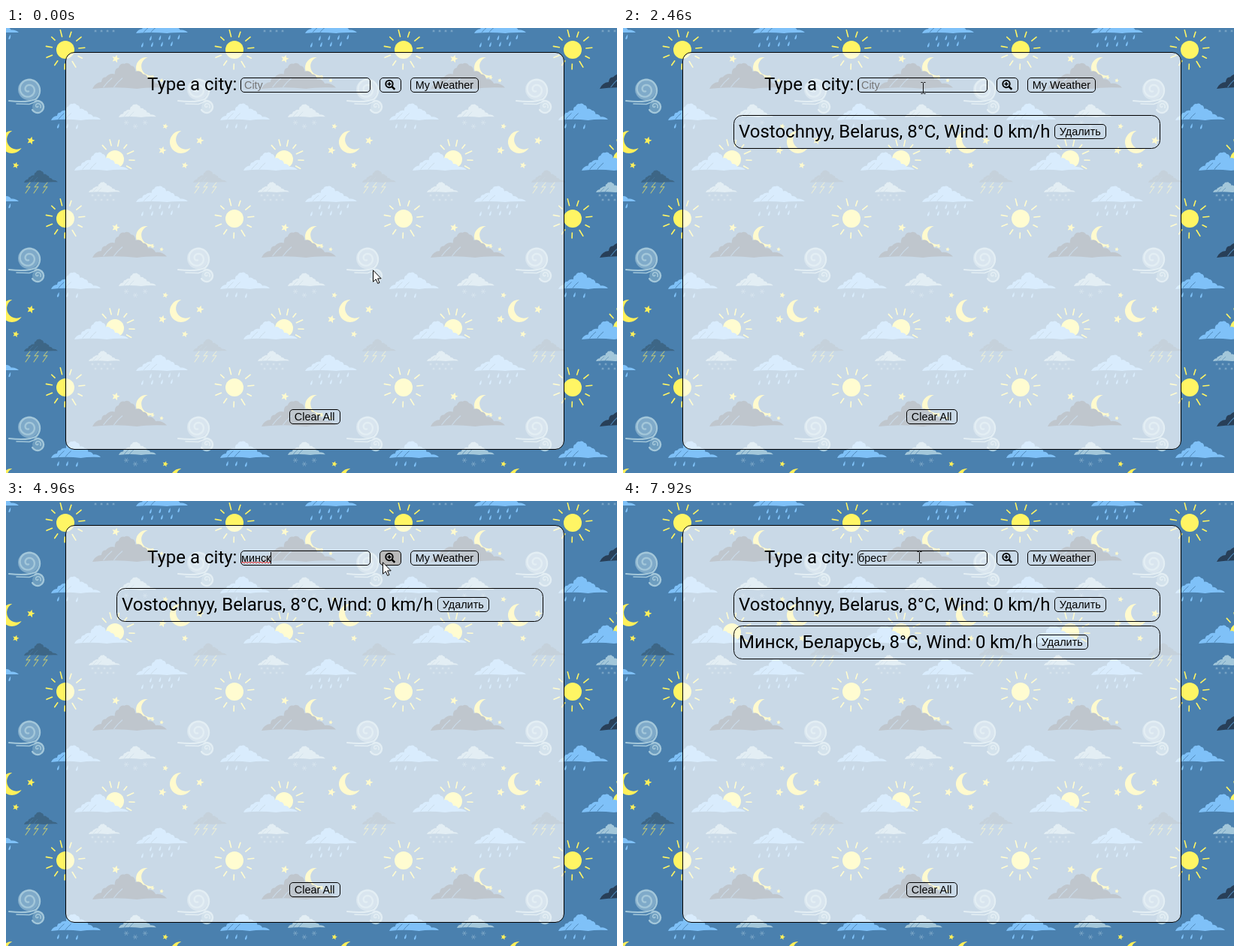
An HTML page with a canvas that plays this animation: 813 px wide and 593 px high, repeating every 8000 ms.

```html
<!DOCTYPE html>
<html lang="en">
<head>
<meta charset="utf-8">
<title>Weather</title>
<style>
html, body { margin: 0; width: 100%; height: 100%; overflow: hidden; background: #4a80ae; }
canvas, svg { position: absolute; left: 0; top: 0; display: block; }
text { white-space: pre; }
.big { font: 24px Roboto, sans-serif; }
.ui { font: 14.4px "Liberation Sans", Arial, sans-serif; }
.box { fill: none; stroke: #000; }
.hot { fill: #b9b9b9; }
</style>
</head>
<body>
<canvas id="sky" width="813" height="593"></canvas>
<svg width="813" height="593" viewBox="0 0 813 593">
  <rect x="79.5" y="32.5" width="663" height="529" rx="11.5" fill="#fff" fill-opacity=".7" stroke="#000"/>
  <text class="big" x="188" y="83">Type a city:</text>
  <rect class="box" x="312.5" y="66.5" width="172" height="19" rx="4.5"/>
  <text id="hint" class="ui" x="317" y="81" fill="#757575">City</text>
  <text id="typed" class="ui" x="313" y="81"></text>
  <path id="wave" fill="none" stroke="#e02020"/>
  <path id="caret" stroke="#000"/>

  <rect id="find" class="box" x="497.5" y="66.5" width="28" height="19" rx="4.5"/>
  <g fill="none" stroke="#000">
    <circle cx="510" cy="74.6" r="4.7" stroke-width="1.9"/>
    <path d="M513.6 78.2L517.3 81.9" stroke-width="2.6"/>
    <path d="M507.5 74.6h5M510 72.1v5" stroke-width="1.6"/>
  </g>
  <rect id="mine" class="box" x="538.5" y="66.5" width="90" height="19" rx="4.5"/>
  <text class="ui" x="544.8" y="81">My Weather</text>

  <g id="row1">
    <rect class="box" x="147.5" y="116.5" width="567" height="44" rx="11"/>
    <text class="big" x="154" y="146">Vostochnyy, Belarus, 8°C, Wind: 0 km/h</text>
    <rect class="box" x="574.5" y="128.5" width="68" height="19" rx="4.5"/>
    <text class="ui" x="580.8" y="143">Удалить</text>
  </g>
  <g id="row2">
    <rect class="box" x="147.5" y="166.5" width="567" height="44" rx="11"/>
    <text class="big" x="154" y="196">Минск, Беларусь, 8°C, Wind: 0 km/h</text>
    <rect class="box" x="550.5" y="178.5" width="68" height="19" rx="4.5"/>
    <text class="ui" x="556.8" y="193">Удалить</text>
  </g>

  <rect class="box" x="377.5" y="508.5" width="67" height="19" rx="4.5"/>
  <text class="ui" x="383.8" y="523">Clear All</text>

  <path id="arrow" d="M.5 .8V16.2L4.2 12.8L6.7 18.4L9 17.4L6.6 11.9H11.2Z" fill="#fff" stroke="#000"/>
  <path id="beam" d="M-3 -7.5H-1L0 -6.5L1 -7.5H3M0 -6.5V6.5M-3 7.5H-1L0 6.5L1 7.5H3" fill="none" stroke="#111"/>
</svg>
<script>
const $ = id => document.getElementById(id);
const g = $('sky').getContext('2d');
const TAU = Math.PI * 2, TILE = 225;
const BLUE = '#4a80ae', GOLD = '#fff564', YELLOW = '#fff05a', LIGHT = '#7fc1f8', PALE = '#a3c7da',
      DARK = '#283f58', SLATE = '#3d6686', BOLT = '#b9c47c';

function line(points, color, width) {
  g.beginPath();
  points.forEach(([x, y]) => g.lineTo(x, y));
  g.strokeStyle = color;
  g.lineWidth = width;
  g.stroke();
}

function disc(x, y, r, color) {
  g.beginPath();
  g.arc(x, y, r, 0, TAU);
  g.fillStyle = color;
  g.fill();
}

function sun(x, y, from, count, step) {
  disc(x, y, 12, GOLD);
  for (let i = 0; i < count; i++) {
    const a = from + i * step, c = Math.cos(a), s = Math.sin(a);
    const r1 = 18 + i % 2, r2 = 25 + i * 2 % 3;
    line([[x + c * r1, y + s * r1], [x + c * r2, y + s * r2]], GOLD, 1.6);
  }
}

// Crescent open towards angle d, its tips at +-a around it
function moon(x, y, r, d, a, shift) {
  const px = r * Math.cos(a) - shift, py = r * Math.sin(a), b = Math.atan2(py, px);
  g.beginPath();
  g.arc(x, y, r, d + a, d - a + TAU);
  g.arc(x + shift * Math.cos(d), y + shift * Math.sin(d), Math.hypot(px, py), d - b, d + b, true);
  g.fillStyle = YELLOW;
  g.fill();
}

function star(x, y, r) {
  g.beginPath();
  for (let i = 0; i < 10; i++) {
    const a = i * TAU / 10 - 1.3, k = i % 2 ? r * .45 : r;
    g.lineTo(x + k * Math.cos(a), y + k * Math.sin(a));
  }
  g.fillStyle = YELLOW;
  g.fill();
}

const BUMPS = [[.12, .74], [.18, .56], [.3, .44], [.35, .2], [.43, .05], [.52, .12],
               [.58, .34], [.68, .44], [.75, .64], [.85, .8], [1, .96]];

function cloud(x, y, w, h, color) {
  g.save();
  g.translate(x, y);
  g.beginPath();
  g.moveTo(0, h);
  let [px, py] = [0, 1];
  for (const [bx, by] of BUMPS) {
    const cx = (px + bx) / 2 + (by - py) * .1, cy = (py + by) / 2 - .11;
    g.quadraticCurveTo(cx * w, cy * h, bx * w, by * h);
    [px, py] = [bx, by];
  }
  g.quadraticCurveTo(.75 * w, .93 * h, .6 * w, h);
  g.quadraticCurveTo(.3 * w, .9 * h, 0, h);
  g.fillStyle = color;
  g.fill();
  g.clip();
  for (const u of [.15, .29]) {
    line([[u * w, .93 * h], [(u + .05) * w, .76 * h], [(u + .11) * w, .6 * h]], BLUE, w / 80);
  }
  g.restore();
}

function drop(x, y) {
  g.beginPath();
  g.moveTo(x + 1.6, y - 4);
  g.quadraticCurveTo(x + 2.2, y + 2.6, x - .6, y + 2.8);
  g.quadraticCurveTo(x - 2.4, y + 1.4, x + 1.6, y - 4);
  g.fillStyle = LIGHT;
  g.fill();
}

function flake(x, y, r) {
  for (let i = 0; i < 3; i++) {
    const c = r * Math.cos(i * TAU / 6), s = r * Math.sin(i * TAU / 6);
    line([[x - c, y - s], [x + c, y + s]], '#7fa9c8', .8);
  }
}

function curl(x, y, r, turns, start, width) {
  const pts = [];
  for (let i = 0; i <= 60; i++) {
    const u = i / 60, a = start - u * turns * TAU, k = r * (1 - u * .85);
    pts.push([x + k * Math.cos(a), y + k * Math.sin(a)]);
  }
  line(pts, PALE, width);
}

// Large curl, a smaller one below it and streaks running in from the left
function wind(x, y) {
  g.globalAlpha = .6;
  disc(x - 1, y - 8, 14, PALE);
  g.globalAlpha = 1;
  curl(x - 1, y - 8, 16, 1.9, .9, 2.4);
  g.beginPath();
  g.moveTo(x - 27, y + 7);
  g.quadraticCurveTo(x - 2, y + 10, x + 9, y + 4.5);
  g.strokeStyle = PALE;
  g.lineWidth = 2;
  g.stroke();
  line([[x - 17, y + 11], [x, y + 11.5], [x + 9, y + 8]], PALE, 1.6);
  g.globalAlpha = .4;
  disc(x + 11, y + 15, 7, PALE);
  g.globalAlpha = 1;
  g.beginPath();
  g.arc(x + 11, y + 15, 8, -2, 2.6);
  g.lineWidth = 2.4;
  g.stroke();
  curl(x + 11, y + 14, 4.5, 1, .5, 1.6);
}

function tile() {
  sun(79, 29, -1.25, 11, TAU / 11);

  moon(187, 53, 14, -.35, 1.1, 6);
  star(146, 41, 5.5);
  star(195, 66, 3);
  star(207, 70, 3);
  cloud(115, 46, 99, 35, DARK);

  wind(31, 90);

  cloud(60, 100, 66, 23, LIGHT);
  [[69, 131], [81, 131], [94, 132]].forEach(p => drop(...p));

  cloud(150, 101, 50, 18, PALE);
  flake(160, 126, 3);
  flake(172, 131, 3);
  flake(185, 126, 3);

  moon(233, 152, 15, -.5, 1.05, 7);
  star(258, 150, 5.5);
  star(208, 163, 5.5);
  star(212, 131, 4);
  star(238, 183, 4.5);

  sun(145, 175, -2.3, 7, .47);
  cloud(91, 165, 72, 25, LIGHT);

  cloud(24, 189, 45, 17, SLATE);
  for (const x of [32, 43, 55]) {
    line([[x, 206], [x - 5, 212], [x, 211.5], [x - 6, 220]], BOLT, 1.1);
  }

  cloud(110, 205, 42, 14, PALE);
  for (let i = 0; i < 8; i++) flake(115 + i * 4, i % 2 ? 229 : 223, 1.3);

  cloud(173, 210, 69, 22, LIGHT);
  for (let i = 0; i < 4; i++) {
    drop(192 + i * 12.5, 239 - i * .5);
    drop(181 + i * 13, 248 - i * .5);
  }
}

g.lineCap = g.lineJoin = 'round';
g.fillStyle = BLUE;
g.fillRect(0, 0, 813, 593);
for (let row = -1; row < 3; row++) {
  for (let col = -2; col < 4; col++) {
    g.save();
    g.translate(col * TILE, row * TILE);
    tile();
    g.restore();
  }
}

// Pointer stops: time, x, y, text beam
const STOPS = [
  [0, 488, 322], [480, 479, 312], [600, 469, 288], [720, 478, 245], [840, 505, 195],
  [960, 535, 157], [1080, 558, 134], [1190, 569, 123],
  [1310, 575, 98], [1430, 578, 83], [1540, 577, 79], [1660, 575, 78], [1780, 545, 79],
  [1890, 455, 80, 1], [2010, 415, 80, 1], [2120, 405, 80, 1], [2240, 399, 80, 1],
  [4360, 434, 91], [4480, 450, 90], [4600, 466, 88], [4720, 480, 85], [4840, 492, 83],
  [4960, 501, 81], [5080, 503, 80], [5200, 503, 79],
  [5320, 465, 77, 1], [5430, 418, 75, 1], [5570, 394, 75, 1]
];
const TYPING = [[0, ''], [3420, 'м'], [3530, 'ми'], [3650, 'мин'], [3760, 'минс'], [3870, 'минск'],
  [5200, ''], [6720, 'б'], [6970, 'бр'], [7070, 'бре'], [7310, 'брес'], [7430, 'брест']];
const CARET = [[2460, 3080], [3420, 4360], [4840, 5200], [6020, 6610], [6720, 7920]];
const LOOP = 8000;

const latest = (list, t) => list.reduce((best, k) => k[0] <= t ? k : best);
const between = (t, a, b) => t >= a && t < b;
const show = (id, on) => $(id).setAttribute('visibility', on ? 'visible' : 'hidden');

let squiggle = 'M313 83';
for (let x = 313; x < 351; x += 4) squiggle += 'l2 -2l2 2';
$('wave').setAttribute('d', squiggle);

function draw(t) {
  const [, x, y, beam] = latest(STOPS, t);
  const word = latest(TYPING, t)[1];
  const over = (a, b) => !beam && x >= a && x <= b && y >= 66 && y <= 86;

  if ($('typed').textContent !== word) $('typed').textContent = word;
  const end = 313.5 + (word ? Math.floor($('typed').getComputedTextLength()) : 0);
  $('caret').setAttribute('d', `M${end} 68V84`);
  show('caret', CARET.some(([a, b]) => between(t, a, b)));
  show('hint', !word);
  show('wave', between(t, 4840, 5200));
  show('row1', t >= 1780);
  show('row2', t >= 5800);
  $('find').classList.toggle('hot', over(497, 526));
  $('mine').classList.toggle('hot', over(538, 629));
  show('arrow', !beam);
  show('beam', beam);
  $('arrow').setAttribute('transform', `translate(${x} ${y})`);
  $('beam').setAttribute('transform', `translate(${x + .5} ${y})`);
}

const start = performance.now();
function tick() {
  draw((performance.now() - start) % LOOP);
  requestAnimationFrame(tick);
}
tick();
</script>
</body>
</html>
```
